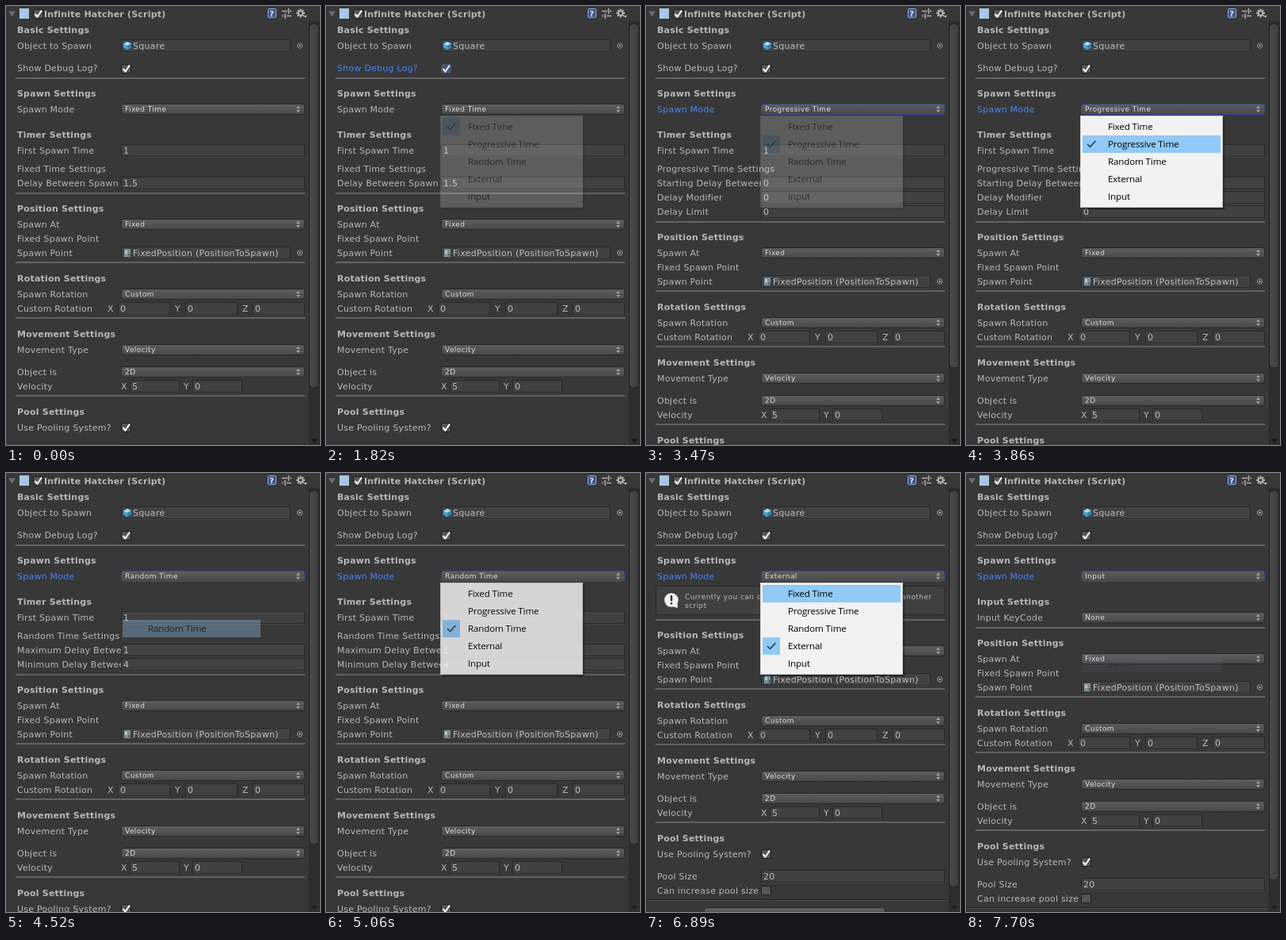
These frames come from a looping animation (396 px wide and 553 px high, 8 s). An HTML page:

```html
<!DOCTYPE html>
<html lang="en">
<head>
<meta charset="utf-8">
<title>Spawner inspector</title>
<style>
  html, body { margin: 0; width: 100%; height: 100%; overflow: hidden; background: #383838; }
  svg { display: block; width: 396px; height: 553px; }
  text { font: 11px "DejaVu Sans", Verdana, sans-serif; letter-spacing: .24px; fill: #b8b8b8; white-space: pre; }
  .head { font-weight: bold; letter-spacing: .2px; }
  .small { font-size: 9px; letter-spacing: .43px; }
  .value { letter-spacing: .3px; fill: #c0c0c0; }
  .bright { fill: #dedede; }
  .item { font: 11.6px "Open Sans", "Noto Sans", sans-serif; letter-spacing: -.15px; fill: #000; }
  .focus { fill: #4a80f5; }
</style>
</head>
<body>
<svg viewBox="0 0 396 553" xmlns="http://www.w3.org/2000/svg">
  <defs>
    <linearGradient id="pop" x2="0" y2="1">
      <stop stop-color="#5e5e5e"/><stop offset="1" stop-color="#484848"/>
    </linearGradient>
    <linearGradient id="thumb">
      <stop stop-color="#4a4a4a"/><stop offset="1" stop-color="#3d3d3d"/>
    </linearGradient>
  </defs>
  <rect width="396" height="553" fill="#383838"/>
  <g id="panel"></g>
  <g id="menu"></g>
  <g id="flash"></g>
</svg>
<script>
const LOOP = 8000, STEP = 30, ROW = 22;
const MODES = ["Fixed Time", "Progressive Time", "Random Time", "External", "Input"];
const POSITION_Y = [255, 291, 273, 204, 214];

// Each visit to the menu: opening time, hovered rows over time, click time, picked mode.
const VISITS = [
  { open: 1820, hover: [[2060, 0], [2210, 1]], click: 2540, pick: 1 },
  { open: 3470, hover: [[3770, 0], [3860, 1], [4010, 2]], click: 4370, pick: 2 },
  { open: 4940, hover: [[5180, 0], [5240, 1], [5300, 2], [5360, 3]], click: 5690, pick: 3 },
  { open: 6470, hover: [[6890, 0], [6950, 1], [7010, 2], [7070, 3], [7100, 4]], click: 7460, pick: 4 }
];

const rect = (x, y, w, h, fill, more = "") =>
  `<rect x="${x}" y="${y}" width="${w}" height="${h}" fill="${fill}" ${more}/>`;
const circle = (x, y, r, fill, more = "") =>
  `<circle cx="${x}" cy="${y}" r="${r}" fill="${fill}" ${more}/>`;
const path = (d, fill, more = "") => `<path d="${d}" fill="${fill}" ${more}/>`;
const text = (x, y, s, cls = "") => `<text x="${x}" y="${y}" class="${cls}">${s}</text>`;

// Rows are placed by the y of their middle.
const label = (y, s, focus) => text(14, y + 4, s, focus ? "focus" : "");
const head = (y, s) => text(14, y + 4, s, "head");
const rule = y => rect(12, y - 1, 365, 2, "#626262");

const box = (x, y, w) =>
  rect(x + .5, y - 7.5, w - 1, 15, "#414141", 'stroke="#292929"') +
  rect(x + 1, y + 8, w - 2, 1, "#464646");

const field = (y, s, x = 145, w = 232) => box(x, y, w) + text(x + 3, y + 4, s, "value");

const popup = (y, s, focus) =>
  rect(145.5, y - 6.5, 231, 13, "url(#pop)", `rx="3" stroke="${focus ? "#2f4a98" : "#272727"}"`) +
  text(150, y + 3, s, "small bright") +
  path(`M366 ${y - 1}h5l-2.5-3zM366 ${y + 1}h5l-2.5 3z`, "#a8a8a8");

const tick = (x, y, color) =>
  path(`M${x + 2.5} ${y + 6}l3 3.5l5.5-8`, "none", `stroke="${color}" stroke-width="2"`);

function checkbox(x, y, { on = true, focus = false, down = false } = {}) {
  const edge = focus ? "#344fa0" : "#1c1c1c";
  return rect(x + .5, y + .5, 12, 11, down ? "#3a3a3a" : "#565656", `rx="2" stroke="${edge}"`) +
    (on ? tick(x, y, focus ? "#e4ebff" : "#fafafa") : "");
}

const objectField = (y, s, icon) =>
  box(145, y, 214) + icon + text(160, y + 4, s, "value") +
  circle(370.5, y, 3.2, "none", 'stroke="#959595"') + circle(370.5, y, 1.2, "#b0b0b0");

const cube = y =>
  path(`M153 ${y - 5}l5 2.5v5l-5 2.8l-5-2.8v-5z`, "#4ba3d8") +
  path(`M153 ${y - 5}l5 2.5l-5 2.5l-5-2.5z`, "#a8dcf5") +
  path(`M153 ${y}l5-2.5v5l-5 2.8z`, "#2f7fb5");

const sheet = y =>
  rect(149, y - 5, 8, 10, "#7d8f9a") + rect(150, y - 3, 3, 4, "#b3c4cc") + rect(154, y + 1, 3, 3, "#566d7a");

const axes = (y, list) =>
  list.map(([name, nx, x, w, value]) => text(nx, y + 4, name) + field(y, value, x, w)).join("");

function header() {
  const teeth = Array.from({ length: 8 }, (_, i) =>
    rect(370.5, 3.5, 2, 3, "#b0b0b0", `transform="rotate(${i * 45} 371.5 9)"`)).join("");
  return path("M3 6.5h9l-4.5 7z", "#6c6c6c") +
    rect(17, 3, 12, 13, "#a9c7e6") +
    checkbox(34, 4) +
    text(48, 14, "Infinite Hatcher (Script)", "head") +
    rect(330.5, 3.5, 10, 11, "#36589a", 'rx="1" stroke="#93a9c8"') +
    `<text x="332.5" y="13" style="font-size:9px;font-weight:bold;fill:#fff">?</text>` +
    path("M348 6.5h7M358 6.5h2M348 12.5h2M354 12.5h6M356.5 3v7M352 9v7", "none", 'stroke="#b0b0b0" stroke-width="1.5"') +
    teeth + circle(371.5, 9, 2.8, "none", 'stroke="#b0b0b0" stroke-width="2"') +
    path("M375 12h5l-2.5 3z", "#b0b0b0");
}

function helpBox() {
  return rect(12.5, 142.5, 364, 36, "#404040", 'rx="3" stroke="#2a2a2a"') +
    circle(32, 160, 8.8, "#f2f2f2") + path("M33 168l7 2l-.5-7z", "#f2f2f2") +
    rect(30.7, 154, 2.6, 7.5, "#333", 'rx="1"') + rect(30.7, 163, 2.6, 2.6, "#333", 'rx="1"') +
    text(49, 159, "Currently you can call the public method Spawn() from another", "small") +
    text(49, 170, "script", "small");
}

function modeRows(mode) {
  if (mode === 3) return helpBox();
  if (mode === 4) return head(162, "Input Settings") + label(182, "Input KeyCode") + popup(182, "None");
  const rows = [
    [["Delay Between Spawn", "1.5"]],
    [["Starting Delay Between", "0"], ["Delay Modifier", "0"], ["Delay Limit", "0"]],
    [["Maximum Delay Between", "1"], ["Minimum Delay Between", "4"]]
  ][mode];
  return head(162, "Timer Settings") + label(182, "First Spawn Time") + field(182, "1") +
    label(205, MODES[mode] + " Settings") +
    rows.map(([s, v], i) => label(223 + 18 * i, s) + field(223 + 18 * i, v)).join("");
}

function lowerRows(y) {
  return rule(y - 19) + head(y, "Position Settings") +
    label(y + 20, "Spawn At") + popup(y + 20, "Fixed") +
    label(y + 38, "Fixed Spawn Point") +
    label(y + 56, "Spawn Point") + objectField(y + 56, "FixedPosition (PositionToSpawn)", sheet(y + 56)) +
    rule(y + 68) + head(y + 88, "Rotation Settings") +
    label(y + 108, "Spawn Rotation") + popup(y + 108, "Custom") +
    label(y + 126, "Custom Rotation") +
    axes(y + 126, [["X", 128, 141, 66, "0"], ["Y", 213, 226, 66, "0"], ["Z", 298, 311, 66, "0"]]) +
    rule(y + 138) + head(y + 158, "Movement Settings") +
    label(y + 178, "Movement Type") + popup(y + 178, "Velocity") +
    label(y + 206, "Object is") + popup(y + 206, "2D") +
    label(y + 224, "Velocity") +
    axes(y + 224, [["X", 145, 156, 63, "5"], ["Y", 224, 235, 63, "0"]]) +
    rule(y + 236) + head(y + 256, "Pool Settings") +
    label(y + 276, "Use Pooling System?") + checkbox(145, y + 270) +
    label(y + 304, "Pool Size") + field(y + 304, "20") +
    label(y + 322, "Can increase pool size") + checkbox(145, y + 316, { on: false }) +
    rect(0, y + 333, 382, 1, "#242424") + rect(0, y + 334, 382, 1, "#494949") +
    rect(73.5, y + 343.5, 228, 20, "url(#pop)", 'rx="3" stroke="#242424"') +
    text(150, y + 357, "Add Component");
}

function scrollbar(y) {
  const view = 534, length = view * view / (370 + y) + 2;
  return rect(382, 19, 14, 534, "#2e2e2e") + rect(382, 19, 1, 534, "#262626") +
    rect(382.5, 22.5, 12, length, "url(#thumb)", 'rx="5" stroke="#222"') +
    path("M385 545.5h8l-4 5z", "#1a1a1a");
}

function panel({ mode, debugFocus, modeFocus, on, down }) {
  const y = POSITION_Y[mode];
  return header() + head(30, "Basic Settings") +
    label(50, "Object to Spawn") + objectField(50, "Square", cube(50)) +
    label(78, "Show Debug Log?", debugFocus) + checkbox(145, 73, { on, down, focus: debugFocus }) +
    rule(91) + head(110, "Spawn Settings") +
    label(130, "Spawn Mode", modeFocus) + popup(130, MODES[mode], modeFocus) +
    modeRows(mode) + lowerRows(y) + scrollbar(y);
}

const rowY = i => 141 + ROW * i;
const item = i => text(179, rowY(i) + 15, MODES[i], "item");
const highlight = (i, w = 174) => rect(147, rowY(i), w, ROW, "#91c9f7");

function menu(checked, hovered) {
  return rect(147, 141, 180, 116, "#000", 'opacity=".18"') + rect(147, 141, 178, 115, "#000", 'opacity=".25"') +
    rect(144.5, 138.5, 179, 115, "#f2f2f2", 'stroke="#cfcfcf"') +
    (hovered >= 0 ? highlight(hovered) : "") + highlight(checked, 22) +
    path(`M153 ${rowY(checked) + 11}l3.5 3.5l7-7.5`, "none", 'stroke="#16324a" stroke-width="1.4"') +
    MODES.map((_, i) => item(i)).join("");
}

const drawn = {};
function put(id, markup, opacity = 1) {
  const node = document.getElementById(id);
  if (drawn[id] !== markup) node.innerHTML = drawn[id] = markup;
  node.setAttribute("opacity", opacity);
}

const snap = dt => Math.floor(dt / STEP + 1e-6) * STEP;

function render(t) {
  let mode = 0, menuMarkup = "", menuAlpha = 1, flashMarkup = "", flashAlpha = 0;
  for (const { open, hover, click, pick } of VISITS) {
    if (t >= open && t < click) {
      const row = hover.filter(([at]) => t >= at).pop();
      menuMarkup = menu(mode, row ? row[1] : -1);
      menuAlpha = Math.min(1, .2 + .8 * snap(t - open) / 150);
    }
    if (t >= click) {
      flashAlpha = Math.max(0, .85 - snap(t - click) / 300);
      flashMarkup = flashAlpha ? highlight(pick) + item(pick) : "";
    }
    if (t >= click + STEP) mode = pick;
  }
  put("panel", panel({
    mode,
    debugFocus: t >= 500 && mode === 0,
    modeFocus: mode > 0,
    on: t < 560 || t >= 1100,
    down: (t >= 500 && t < 560) || (t >= 920 && t < 1100)
  }));
  put("menu", menuMarkup, menuAlpha);
  put("flash", flashMarkup, flashAlpha);
}

function animate() {
  render(performance.now() % LOOP);
  requestAnimationFrame(animate);
}
render(0);
requestAnimationFrame(animate);
</script>
</body>
</html>
```
